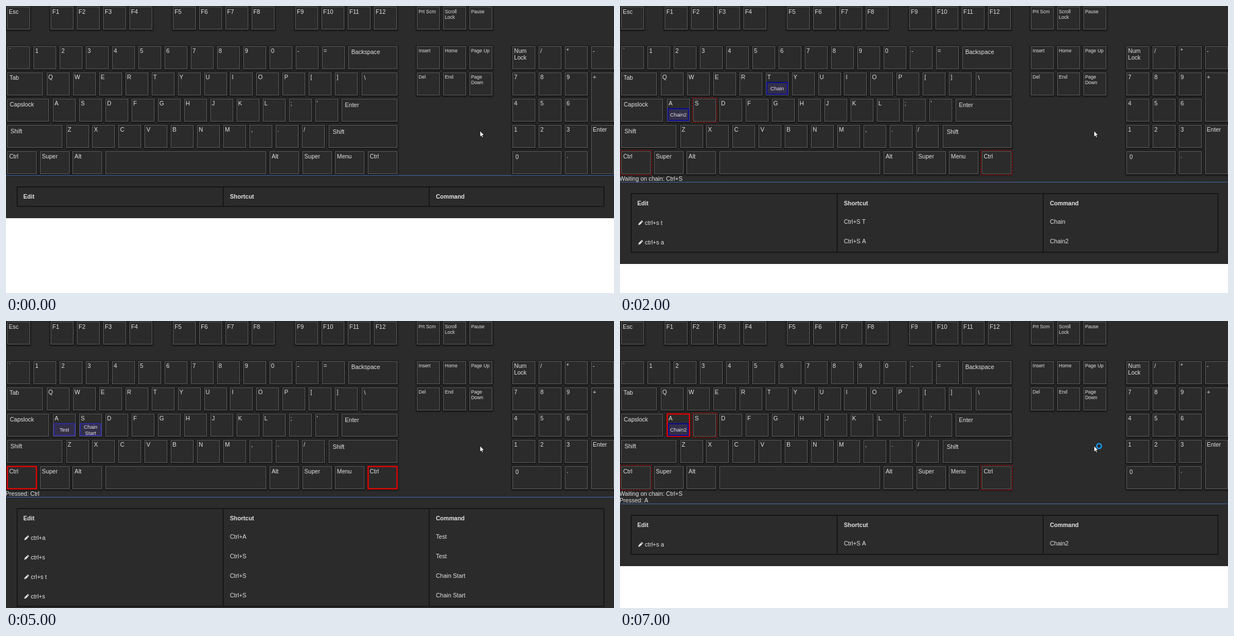
These frames come from a looping animation (1089x514 px, 8000 ms). An HTML page with a canvas:

```html
<!DOCTYPE html>
<html lang="en">
<head>
<meta charset="utf-8">
<title>Keyboard shortcuts</title>
<style>
  html, body { margin: 0; width: 100%; height: 100%; overflow: hidden; background: #fff; }
  canvas { display: block; width: 1089px; height: 514px; }
</style>
</head>
<body>
<canvas id="stage" width="1089" height="514"></canvas>
<script>
const ctx = document.getElementById('stage').getContext('2d');
const FACE = '"Liberation Sans", Arial, sans-serif';
const BG = '#2b2b2b', INK = '#e2e2e2', EDGE = '#171717';
const SIZE = 10.56, STEP = 1000, PITCH = 46.95, KEY = 41;

const keys = [];
function key(x, y, label, w = KEY, h = KEY, small = false) {
  keys.push({ x, y, w, h, label, small });
}
function run(x, y, labels, small) {
  labels.forEach((label, i) => key(x + i * PITCH, y, label, KEY, KEY, small));
}

const [Y0, Y1, Y2, Y3, Y4, Y5] = [1.7, 72, 119, 166, 213, 260];
key(2, Y0, 'Esc');
run(80, Y0, ['F1', 'F2', 'F3', 'F4']);
run(299, Y0, ['F5', 'F6', 'F7', 'F8']);
run(518, Y0, ['F9', 'F10', 'F11', 'F12']);
run(2.2, Y1, [...'`1234567890-=']);
key(613, Y1, 'Backspace', 88);
key(2, Y2, 'Tab', 64);
run(72.8, Y2, [...'QWERTYUIOP[]']);
key(637, Y2, '\\', 64);
key(2, Y3, 'Capslock', 75);
run(84, Y3, [...'ASDFGHJKL;\'']);
key(601, Y3, 'Enter', 100);
key(2, Y4, 'Shift', 99);
run(107.5, Y4, [...'ZXCVBNM,./']);
key(578, Y4, 'Shift', 123);
['Ctrl', 'Super', 'Alt'].forEach((s, i) => key(2 + i * 58.6, Y5, s, 53));
key(178, Y5, '', 288);
['Alt', 'Super', 'Menu', 'Ctrl'].forEach((s, i) => key(472 + i * 58.6, Y5, s, 53));
run(736, Y0, ['Prt Scrn', 'Scroll\nLock', 'Pause'], true);
run(736, Y1, ['Insert', 'Home', 'Page Up'], true);
run(736, Y2, ['Del', 'End', 'Page\nDown'], true);
run(907, Y1, ['Num\nLock', '/', '*', '-']);
run(907, Y2, [...'789']);
run(907, Y3, [...'456']);
run(907, Y4, [...'123']);
key(907, Y5, '0', 88);
key(1001, Y5, '.');
key(1048, Y2, '+', KEY, 88);
key(1048, Y4, 'Enter', KEY, 88);

const idle = { msg: [], rows: [] };
const ctrl = {
  msg: ['Pressed: Ctrl'],
  held: ['Ctrl'],
  tips: { A: ['Test'], S: ['Chain', 'Start'] },
  tipEdge: '#2d2d98',
  rows: [
    ['ctrl+a', 'Ctrl+A', 'Test'],
    ['ctrl+s', 'Ctrl+S', 'Test'],
    ['crl+s t', 'Ctrl+S', 'Chain Start'],
    ['ctrl+s', 'Ctrl+S', 'Chain Start']
  ]
};
const chain = {
  msg: ['Waiting on chain: Ctrl+S'],
  chained: ['Ctrl', 'S'],
  tips: { T: ['Chain'], A: ['Chain2'] },
  rows: [['ctrl+s t', 'Ctrl+S T', 'Chain'], ['ctrl+s a', 'Ctrl+S A', 'Chain2']]
};
const again = {
  msg: ['Waiting on chain: Ctrl+S', 'Pressed: Ctrl'],
  held: ['Ctrl'],
  chained: ['S'],
  rows: []
};
const miss = { msg: ['No chained shortcut Ctrl+S Ctrl+S'], rows: [] };
const hit = {
  msg: ['Waiting on chain: Ctrl+S', 'Pressed: A'],
  held: ['A'],
  chained: ['Ctrl', 'S'],
  tips: { A: ['Chain2'] },
  rows: [['ctrl+s a', 'Ctrl+S A', 'Chain2']],
  busy: true
};
const scenes = [idle, ctrl, chain, again, miss, ctrl, chain, hit];

function text(s, x, y, size = SIZE, weight = 'normal', align = 'left') {
  ctx.font = `${weight} ${size}px ${FACE}`;
  ctx.textAlign = align;
  ctx.fillStyle = INK;
  ctx.fillText(s, x, Math.round(y));
}
function box(x, y, w, h, color) {
  ctx.fillStyle = color;
  ctx.fillRect(x, y, w, h);
}
function frame(x, y, w, h, color, line = 1) {
  ctx.strokeStyle = color;
  ctx.lineWidth = line;
  ctx.strokeRect(x + line / 2, y + line / 2, w - line, h - line);
}

function drawKey(k, scene) {
  const x = Math.round(k.x), y = Math.floor(k.y), { w, h } = k;
  ctx.save();
  ctx.shadowColor = 'rgba(0,0,0,.75)';
  ctx.shadowBlur = 3;
  ctx.shadowOffsetY = 1;
  box(x - 1, y - 1, w + 2, h + 2, '#191919');
  ctx.restore();
  box(x, y, w, h, BG);
  frame(x, y, w, h, '#5c5c5c');

  const held = scene.held?.includes(k.label);
  if (held) frame(x - 0.5, y - 0.5, w + 1, h + 1, '#f00', 2);
  if (scene.chained?.includes(k.label)) {
    ctx.setLineDash([3, 2]);
    frame(x - 2, y - 2, w + 4, h + 4, '#d00000');
    ctx.setLineDash([]);
  }

  const pad = w * 0.05;
  k.label.split('\n').forEach((s, i) => {
    if (k.small) text(s, k.x + 1 + pad, k.y + 11 + i * 10, 8.5);
    else text(s, k.x + 1 + pad, k.y + 10 + pad + i * 12);
  });

  const tip = scene.tips?.[k.label];
  if (tip) {
    const inset = held ? 2 : 1;
    box(x + inset, y + 17, w - 2 * inset, 23, '#332f49');
    frame(x + inset, y + 17, w - 2 * inset, 23, scene.tipEdge || '#0d0d92', 2);
    tip.forEach((s, i) =>
      text(s, x + w / 2, y + 32 + (i - (tip.length - 1) / 2) * 11, 9.4, 'normal', 'center'));
  }
}

function drawPencil(x, y) {
  ctx.save();
  ctx.translate(x, y);
  ctx.rotate(-Math.PI / 4);
  box(-3, -1.7, 5.6, 3.4, INK);
  box(3.2, -1.7, 1.7, 3.4, INK);
  ctx.beginPath();
  ctx.moveTo(-3, -1.7);
  ctx.lineTo(-5.6, 0);
  ctx.lineTo(-3, 1.7);
  ctx.fill();
  ctx.restore();
}

function drawTable(top, rows) {
  const h = 37 + rows.length * 35, cols = [31, 401, 770];
  frame(19, top, 1053, h, EDGE, 2);
  box(388, top, 2, h, EDGE);
  box(757, top, 2, h, EDGE);
  ['Edit', 'Shortcut', 'Command'].forEach((s, i) => text(s, cols[i], top + 22, SIZE, 'bold'));
  rows.forEach(([edit, shortcut, command], i) => {
    const y = top + 55 + i * 35;
    drawPencil(36.7, y - 1.5);
    text(edit, 44.5, y + 2);
    text(shortcut, cols[1], y);
    text(command, cols[2], y);
  });
  return top + h;
}

function drawCursor(busy) {
  const outline = [[0, 0], [0, 11], [2.5, 8.8], [4.1, 12.5], [5.9, 11.7], [4.3, 8.1], [7.7, 8.1]];
  ctx.beginPath();
  outline.forEach(([x, y]) => ctx.lineTo(849 + x, 223.5 + y));
  ctx.closePath();
  ctx.fillStyle = '#fff';
  ctx.fill();
  ctx.strokeStyle = '#000';
  ctx.lineWidth = 0.8;
  ctx.stroke();
  if (busy) {
    ctx.beginPath();
    ctx.arc(858, 224, 4.2, 0, Math.PI * 2);
    ctx.strokeStyle = '#1c92e4';
    ctx.lineWidth = 2.6;
    ctx.stroke();
  }
}

function draw(scene) {
  const line = 303 + scene.msg.length * 12;
  box(0, 0, 1089, 514, BG);
  keys.forEach(k => drawKey(k, scene));
  scene.msg.forEach((s, i) => text(s, -1, 313 + i * 12));
  box(0, line, 1089, 1, '#4166a5');
  const bottom = drawTable(line + 20, scene.rows) + 20;
  if (bottom < 514) box(0, bottom, 1089, 514 - bottom, '#fff');
  drawCursor(scene.busy);
}

let shown = -1;
const start = performance.now();
function tick() {
  const index = Math.floor((performance.now() - start) / STEP) % scenes.length;
  if (index !== shown) draw(scenes[shown = index]);
  requestAnimationFrame(tick);
}
tick();
</script>
</body>
</html>
```
